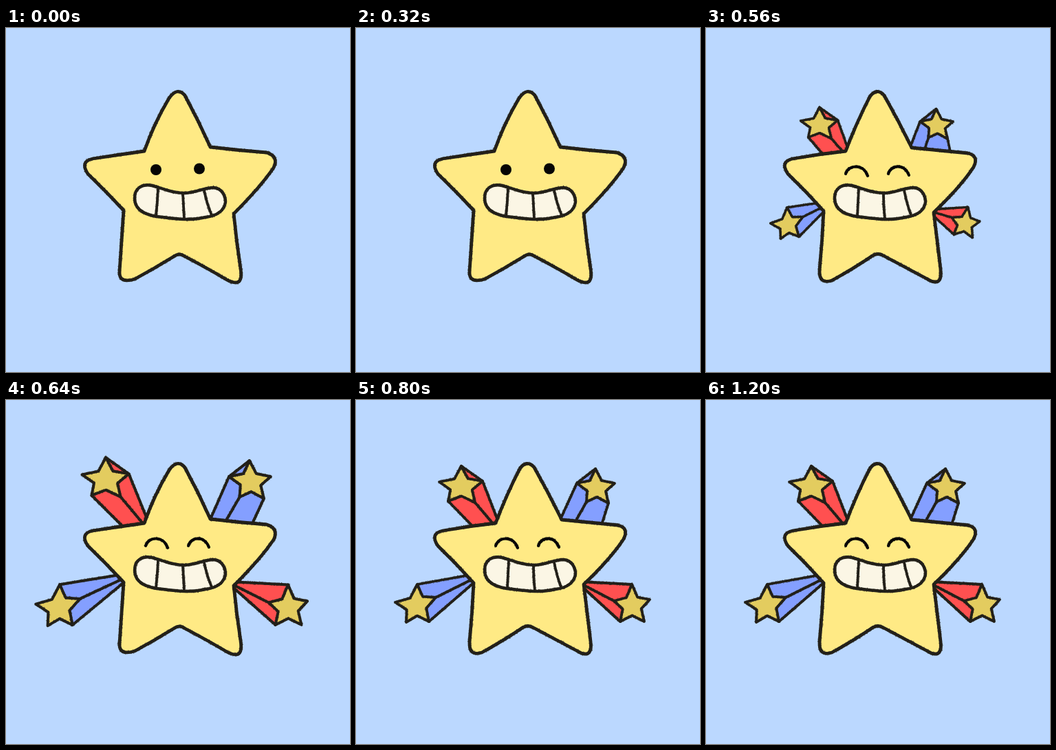
Write an HTML page with a canvas that moves like this. It is 500 px wide and 500 px high and loops after 1.28 s.

```html
<!DOCTYPE html>
<html lang="en">
<head>
<meta charset="utf-8">
<title>Star burst</title>
<style>
html, body { margin: 0; width: 100%; height: 100%; overflow: hidden; background: #bbd8ff; }
canvas { display: block; width: 500px; height: 500px; }
</style>
</head>
<body>
<canvas id="stage" width="500" height="500"></canvas>
<script>
const ctx = document.getElementById('stage').getContext('2d');
const LOOP = 1280, STEP = 80, BURST = 6;
const INK = '#24211a', SKY = '#bbd8ff', BODY = '#ffea85', TOOTH = '#fbf6e5';
const GOLD = '#e3cc5f', RED = '#ff5050', BLUE = '#849fff';

// Two hand-drawn versions of the line work, swapped for a boiling outline.
const bodies = [
  'M237 102 Q249 85 260 98 Q280 135 297 173 Q339 178 379 181 Q397 187 389 203 Q370 231 331 270 Q335 311 341 350 Q344 370 334 370 Q328 370 321 366 Q296 351 260 332 Q252 326 244 332 Q215 350 187 365 Q164 372 165 354 Q168 310 171 265 Q146 238 119 212 Q107 194 126 190 Q165 184 201 179 Q215 139 237 102Z',
  'M238 100 Q248 86 259 98 Q280 135 299 174 Q340 178 381 182 Q397 186 389 202 Q370 231 331 268 Q336 311 341 351 Q343 370 333 369 Q328 369 322 365 Q294 350 258 331 Q250 326 242 331 Q214 350 183 367 Q164 373 165 352 Q169 310 171 266 Q146 238 119 212 Q107 194 126 190 Q165 183 203 179 Q218 139 238 100Z'
];
const mouth = 'M187 247 C187 232 199 226 212 229 C228 233 240 240 260 240 C276 239 288 232 302 232 C314 233 319 244 319 253 C317 266 306 273 290 275 C270 280 250 278 228 275 C206 273 187 267 187 247Z';
const gaps = [
  'M221 234 Q220 254 218 273 M257 240 Q258 260 259 277 M288 236 Q292 256 299 272',
  'M222 234 Q221 254 220 273 M258 240 Q258 260 260 277 M288 236 Q292 256 298 272'
];
const smiles = 'M203 212 C207 198 229 197 235 215 M265 212 C269 198 289 197 295 214';

// star: five points around its centre, clockwise from the top.
// poses: peeking, overshoot, rest as [x, y, scale, tilt].
// tips: points the ribbon leaves from, the ridge next to last; ends lie behind the body.
const rays = [
  { color: RED, tips: [0, 1, 2, 3], ends: [[208, 180], [202, 183], [172, 186]],
    star: [[0, -30], [31, -8], [20, 23], [-19, 21], [-32, -7]],
    poses: [[185, 166, 0.63, 0], [145, 116, 1.08, 0], [153, 126, 1, 0]] },
  { color: BLUE, tips: [0, 4, 3, 2], ends: [[294, 180], [316, 182], [356, 184]],
    star: [[-1, -28], [27, -7], [18, 22], [-14, 20], [-28, -7]],
    poses: [[316, 165, 0.64, 0], [355, 119, 1.1, 0], [349, 128, 1, 0]] },
  { color: BLUE, tips: [0, 1, 2], ends: [[178, 252], [178, 256], [180, 258]],
    star: [[1, -31], [28, -12], [18, 23], [-15, 24], [-31, -5]],
    poses: [[161, 270, 0.53, -9], [77, 302, 1.09, 0], [88, 299, 1, 0]] },
  { color: RED, tips: [0, 4, 3], ends: [[325, 264], [325, 266], [325, 268]],
    star: [[0, -31], [26, -9], [18, 23], [-17, 23], [-26, -7]],
    poses: [[343, 267, 0.5, 20], [410, 302, 1.08, 0], [401, 299, 1, 0]] }
];

const probe = document.createElementNS('http://www.w3.org/2000/svg', 'path');
let seed = 1;
function rand() {
  seed = (seed * 16807) % 2147483647;
  return seed / 2147483647;
}

function fill(d, color) {
  ctx.fillStyle = color;
  ctx.fill(new Path2D(d));
}

// Solid core with loose grains along both edges.
function crayon(d, width, color = INK) {
  ctx.strokeStyle = ctx.fillStyle = color;
  ctx.lineWidth = width - 0.8;
  ctx.stroke(new Path2D(d));
  ctx.globalAlpha = 0.55;
  for (const part of d.split(/(?=M)/)) {
    probe.setAttribute('d', part);
    const length = probe.getTotalLength();
    for (let s = 0; s < length; s += 0.6) {
      const p = probe.getPointAtLength(s);
      const a = rand() * Math.PI * 2, r = width * (0.3 + rand() * 0.22);
      ctx.fillRect(p.x + Math.cos(a) * r - 0.6, p.y + Math.sin(a) * r - 0.6, 1.2, 1.2);
    }
  }
  ctx.globalAlpha = 1;
}

const mix = (a, b, t) => a + (b - a) * t;
const line = points => 'M' + points.map(p => p.join(' ')).join('L');

// Each leg between poses lasts two steps.
function poseAt(poses, step) {
  const leg = Math.min(step / 2, 2);
  const i = Math.min(Math.floor(leg), 1);
  return poses[i].map((v, k) => mix(v, poses[i + 1][k], leg - i));
}

function drawRay(ray, step) {
  const [x, y, scale, tilt] = poseAt(ray.poses, step);
  const cos = Math.cos(tilt * Math.PI / 180) * scale;
  const sin = Math.sin(tilt * Math.PI / 180) * scale;
  const place = ([u, v]) => [x + u * cos - v * sin, y + u * sin + v * cos];
  const width = mix(2.6, 4.6, scale);

  const tips = ray.tips.map(k => place(ray.star[k]));
  const last = tips.pop(), ridge = tips.pop();
  const ribbon = line([...tips, ...ray.ends, last]) + 'Z';
  fill(ribbon, ray.color);
  crayon(ribbon, width);
  crayon(line([ridge, ray.ends[1]]), width);

  const outline = ray.star.flatMap((p, k) => {
    const next = ray.star[(k + 1) % 5];
    return [place(p), place([(p[0] + next[0]) * 0.31, (p[1] + next[1]) * 0.31])];
  });
  const star = line(outline) + 'Z';
  fill(star, GOLD);
  crayon(star, width);
}

function dot(x, y) {
  ctx.beginPath();
  ctx.arc(x, y, 8, 0, Math.PI * 2);
  ctx.fill();
}

function draw(step) {
  const boil = (step >> 1) % 2;
  const happy = step >= BURST;
  seed = 71 + boil * 400;
  ctx.fillStyle = SKY;
  ctx.fillRect(0, 0, 500, 500);
  ctx.lineCap = ctx.lineJoin = 'round';

  if (happy) for (const ray of rays) drawRay(ray, step - BURST);

  fill(bodies[boil], BODY);
  crayon(bodies[boil], 5.6);
  fill(mouth, TOOTH);
  crayon(gaps[boil], 4.6);
  crayon(mouth, 5.2);

  if (happy) {
    crayon(smiles, 4.9, '#080808');
  } else {
    ctx.fillStyle = '#050505';
    dot(218, 206);
    dot(281, 204.5);
  }
}

let shown = -1;
function tick() {
  const step = Math.floor(performance.now() % LOOP / STEP);
  if (step !== shown) draw(shown = step);
  requestAnimationFrame(tick);
}
tick();
</script>
</body>
</html>
```
